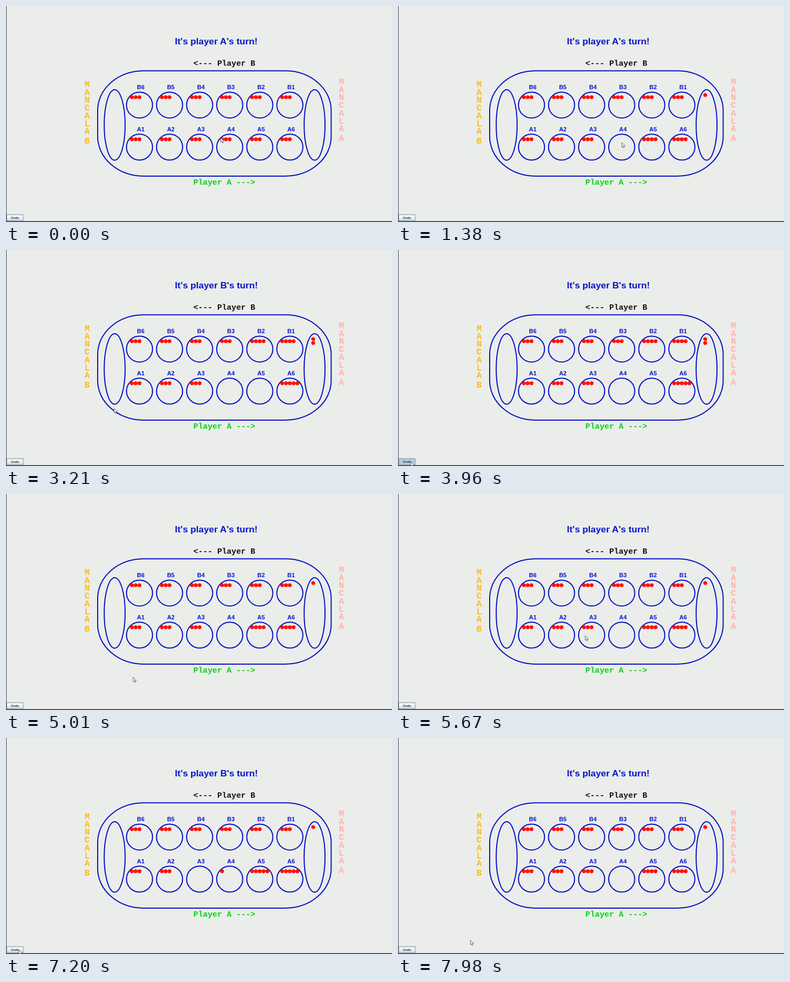
These frames come from a looping animation (720x405 px, 8000 ms). An HTML page:

```html
<!DOCTYPE html>
<html lang="en">
<head>
<meta charset="utf-8">
<title>Mancala</title>
<style>
  html, body { margin: 0; width: 100%; height: 100%; overflow: hidden; background: #ebedea; }
  svg { display: block; width: 100vw; height: 100vh; }
  text { font: bold 11px "Liberation Sans", Arial, sans-serif; fill: #0814c8; }
  .title { font-size: 17.25px; }
  .mono { font-family: "Liberation Mono", "Courier New", monospace; font-size: 14.8px; }
  .store { font-size: 16px; text-anchor: middle; }
  .line { fill: none; stroke: #0612c4; stroke-width: 2; }
  #stones { fill: #fb1208; }
</style>
</head>
<body>
<svg viewBox="0 0 720 405">
  <rect width="720" height="405" fill="#ebedea"/>
  <rect width="1.2" height="405" fill="#5a5d60"/>
  <rect y="403.5" width="720" height="1.5" fill="#25282c"/>
  <g class="line">
    <rect x="171" y="121.5" width="435.5" height="197.5" rx="86" ry="74"/>
    <ellipse cx="202.7" cy="223" rx="19.5" ry="66"/>
    <ellipse cx="575.6" cy="223" rx="19.5" ry="66"/>
  </g>
  <text id="title" class="title" x="315" y="72"></text>
  <text class="mono" x="349.5" y="112" style="fill:#111">&lt;--- Player B</text>
  <text class="mono" x="349.5" y="334.5" style="fill:#08d018">Player A ---&gt;</text>
  <g id="board"></g>
  <g id="stones"></g>
  <linearGradient id="metal" x2="0" y2="1">
    <stop stop-color="#dfe8f0"/><stop offset=".35" stop-color="#fbfcfd"/><stop offset="1" stop-color="#c2d2e0"/>
  </linearGradient>
  <rect id="button" x="1.5" y="391" width="30.5" height="12" stroke="#7a8a99" stroke-width=".9"/>
  <text x="9.2" y="399.4" style="font-size:6px;fill:#333">Undo</text>
  <path id="cursor" d="M0 0V8.6L1.9 6.9L3.3 10L4.7 9.4L3.3 6.4H6Z" fill="#f4f5f5" stroke="#4c4f55" stroke-width=".8"/>
</svg>
<script>
const LOOP = 8000;
const $ = id => document.getElementById(id);

// Pits run counter-clockwise: A1-A6, store A (6), B1-B6
const pitX = i => 249 + 56.1 * (i < 6 ? i : 12 - i);
const pitY = i => i < 6 ? 264.5 : 185.7;

function drawBoard() {
  let out = '';
  for (let i = 0; i < 13; i++) {
    if (i === 6) continue;
    const name = i < 6 ? 'A' + (i + 1) : 'B' + (i - 6);
    out += `<circle class="line" cx="${pitX(i)}" cy="${pitY(i)}" r="24.3"/>
      <text x="${pitX(i) - 4.7}" y="${pitY(i) - 29.4}">${name}</text>`;
  }
  const column = (word, x, y, color) => [...word].forEach((c, i) => {
    out += `<text class="mono store" x="${x}" y="${y + 14.7 * i + (i > 6 ? 3 : 0)}" style="fill:${color}">${c}</text>`;
  });
  column('MANCALAB', 151.3, 152, '#fdbb1c');
  column('MANCALAA', 625.5, 147, '#ffb2aa');
  $('board').innerHTML = out;
}

function sow(pits, from) {
  const next = [...pits];
  next[from] = 0;
  for (let k = 1; k <= pits[from]; k++) next[from + k]++;
  return next;
}

const start = Array.from({ length: 13 }, (_, i) => i === 6 ? 0 : 3);
const first = sow(start, 3);
const states = [
  [0, 'A', start],
  [1170, 'A', first],
  [2250, 'B', sow(first, 4)],
  [4020, 'A', first],
  [6090, 'B', sow(first, 2)],
  [7530, 'A', first]
];
const presses = [[3900, 4050], [7410, 7560]];

// Pointer: time, x, y
const path = [
  [0, 400.7, 247], [30, 400.7, 247], [330, 417.5, 256], [1380, 417.5, 256],
  [2130, 471, 258], [2820, 471, 258], [3210, 202, 296.5], [3600, 38, 387],
  [3780, 24, 397], [4230, 24, 397], [5010, 237, 343.5], [5820, 355, 260],
  [6120, 355, 260], [6510, 269.5, 300], [6840, 78, 369], [7080, 24, 397],
  [7650, 24, 397], [7980, 135, 379], [8000, 135, 379]
];

// Hermite slope, zero wherever the pointer rests
function slope(i, axis) {
  const a = path[i - 1], b = path[i], c = path[i + 1];
  if (!a || !c) return 0;
  const before = b[axis] - a[axis], after = c[axis] - b[axis];
  return before * after <= 0 ? 0 : (before + after) / (c[0] - a[0]);
}

function pointer(t, axis) {
  const i = Math.max(0, path.findIndex(p => p[0] > t) - 1);
  const a = path[i], b = path[i + 1], d = b[0] - a[0], u = (t - a[0]) / d;
  const v = 1 - u;
  return v * v * (1 + 2 * u) * a[axis] + u * u * (3 - 2 * u) * b[axis]
    + d * u * v * (v * slope(i, axis) - u * slope(i + 1, axis));
}

function drawState([, turn, pits]) {
  $('title').textContent = `It's player ${turn}'s turn!`;
  let out = '';
  pits.forEach((n, i) => {
    for (let k = 0; k < n; k++) {
      const x = i === 6 ? 573 : pitX(i) - 14.3 + 7.1 * k;
      const y = i === 6 ? 167 + 7.3 * k : pitY(i) - 14.7;
      out += `<circle cx="${x}" cy="${y}" r="3.6"/>`;
    }
  });
  $('stones').innerHTML = out;
}

let shown;
function frame(now) {
  const t = now % LOOP;
  const state = states.filter(s => s[0] <= t).pop();
  if (state !== shown) drawState(shown = state);
  const pressed = presses.some(([a, b]) => t >= a && t < b);
  $('button').setAttribute('fill', pressed ? '#b3cbe0' : 'url(#metal)');
  $('cursor').setAttribute('transform', `translate(${pointer(t, 1)} ${pointer(t, 2)})`);
  requestAnimationFrame(tick);
}

drawBoard();
const origin = performance.now();
const tick = () => frame(performance.now() - origin);
tick();
</script>
</body>
</html>
```
